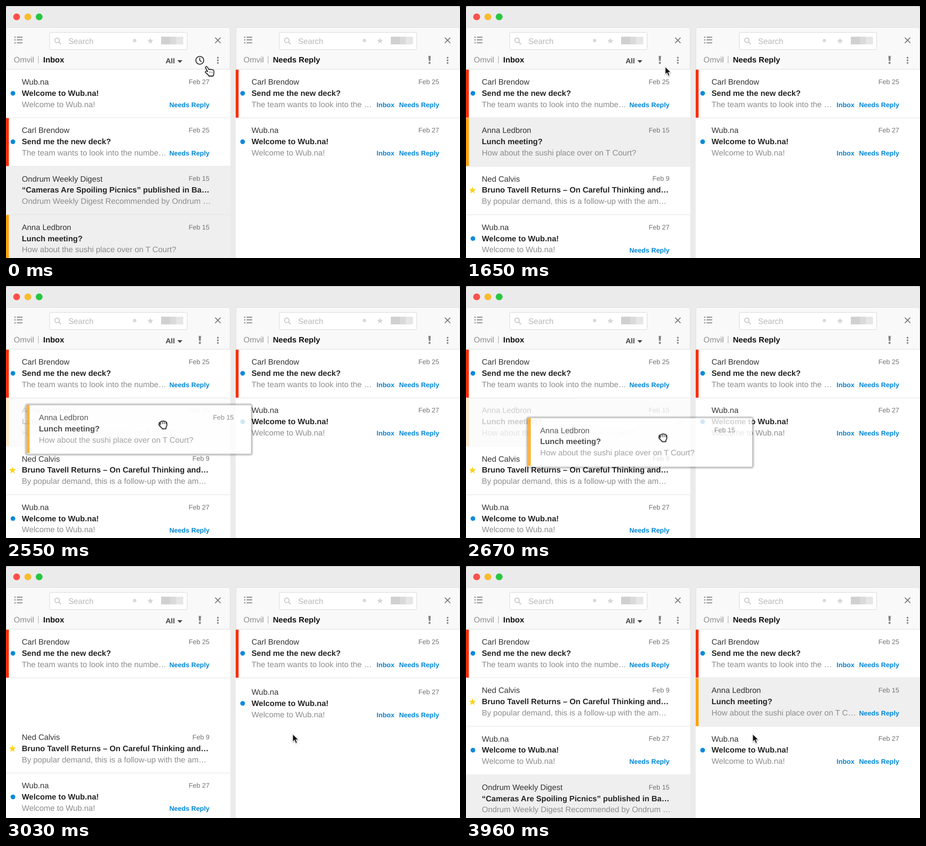
Recreate the animation shown at these times as an HTML page. Size 1004x558 px, loop 4710 ms.

```html
<!DOCTYPE html>
<html lang="en">
<head>
<meta charset="utf-8">
<title>Two mail panes</title>
<style>
html, body { margin: 0; height: 100%; overflow: hidden; background: #ebebeb; }
svg { display: block; }
text { font: 17.4px "Liberation Sans", Arial, sans-serif; fill: #333; text-rendering: geometricPrecision; }
.bold { font-weight: bold; fill: #252525; }
.soft { font-size: 17.55px; fill: #8c8c8c; }
.date { font-size: 14.8px; fill: #747474; text-anchor: end; }
.tag { font-size: 14.8px; font-weight: bold; fill: #0288d6; text-anchor: end; }
.line { fill: none; stroke: #858585; stroke-width: 2; }
#cursor { filter: drop-shadow(0 1px 1px rgba(0, 0, 0, .4)); }
</style>
</head>
<body>
<svg id="stage" width="1004" height="558" viewBox="0 0 1004 558"></svg>
<script>
const LOOP = 4710, STEP = 30, ROW = 107.2;

const text = (x, y, s, cls = '') => `<text x="${x}" y="${y}" class="${cls}">${s}</text>`;
const rect = (x, y, w, h, fill, more = '') =>
  `<rect x="${x}" y="${y}" width="${w}" height="${h}" fill="${fill}" ${more}/>`;
const dot = (x, y, r, fill) => `<circle cx="${x}" cy="${y}" r="${r}" fill="${fill}"/>`;
const path = (d, more) => `<path d="${d}" ${more}/>`;
const group = (id, body) => `<g id="${id}">${body}</g>`;

function star(x, y, r, fill) {
  const points = Array.from({ length: 10 }, (_, i) => {
    const a = i * Math.PI / 5, d = i % 2 ? r * .42 : r;
    return [x + d * Math.sin(a), y - d * Math.cos(a)].map(v => v.toFixed(2));
  });
  return `<polygon points="${points.join(' ')}" fill="${fill}"/>`;
}

const mails = {
  wub: { name: 'Wub.na', date: 'Feb 27', subject: 'Welcome to Wub.na!', body: 'Welcome to Wub.na!', reply: true, unread: true },
  carl: { name: 'Carl Brendow', date: 'Feb 25', subject: 'Send me the new deck?', body: 'The team wants to look into the numbe…',
    reply: true, unread: true, bar: '#ff2d0a' },
  digest: { name: 'Ondrum Weekly Digest', date: 'Feb 15', subject: '“Cameras Are Spoiling Picnics” published in Ba…',
    body: 'Ondrum Weekly Digest Recommended by Ondrum …', read: true },
  anna: { name: 'Anna Ledbron', date: 'Feb 15', subject: 'Lunch meeting?', body: 'How about the sushi place over on T Court?',
    read: true, bar: '#ffa20a' },
  ned: { name: 'Ned Calvis', date: 'Feb 9', subject: 'Bruno Tavell Returns – On Careful Thinking and…',
    body: 'By popular demand, this is a follow-up with the am…', starred: true }
};

// `inset` moves the left and right text edges outward, as on the dragged card.
function row(m, inset = 0) {
  const left = 35 - inset, right = 450 + inset;
  return rect(0, 0, 496, ROW, m.read ? '#efefef' : '#fff') +
    (inset || m.last ? '' : rect(0, ROW - 1, 496, 1, '#dedede')) +
    (m.bar ? rect(0, 0, 6.3, ROW - 1, m.bar) : '') +
    (m.unread ? dot(15.3, 52.3, 5.2, '#0a8ade') : '') +
    (m.starred ? star(14.3, 53, 8.2, '#fbd414') : '') +
    text(left, 33.3, m.name) + text(right, 32, m.date, 'date') +
    text(left, 58, m.subject, 'bold') + text(left, 82.8, m.body, 'soft') +
    (m.reply ? text(right, 83, 'Needs Reply', 'tag') : '') +
    (m.inbox ? text(351, 83, 'Inbox', 'tag') : '');
}

const bang = path('M426 110.5h5.4l-.9 11.3h-3.6z', 'fill="#858585"') + dot(428.7, 126, 2.4, '#858585');
const clock = dot(428.5, 120.5, 17, '#fcfcfc') +
  path('M419.8 120.2a8.8 8.8 0 1 0 17.6 0a8.8 8.8 0 1 0-17.6 0M428.5 114.5v6l4 3', 'class="line" style="stroke:#333"');

function header(title, extra) {
  const bullets = [69, 75, 81.5].map(y => rect(18.5, y - 1, 3, 2.2, '#858585') + rect(24, y - 1, 12.5, 2, '#858585')).join('');
  const more = [114.5, 120.2, 126].map(y => dot(468.5, y, 2, '#858585')).join('');
  return rect(.5, 47.5, 495, 520, '#f9f9f9', 'rx="5" stroke="#dcdcdc"') +
    rect(0, 140, 496, 418, '#fff') + rect(0, 139.5, 496, 1, '#dadada') + bullets +
    rect(96.5, 58.5, 304, 38, '#fff', 'rx="2" stroke="#d6d6d6"') +
    path('M108 76a5 5 0 1 0 10 0a5 5 0 1 0-10 0M116.7 79.7l5 5', 'class="line" style="stroke:#c6c6c6"') +
    text(138, 83.6, 'Search', 'soft" style="fill:#b8b8b8') +
    dot(284.5, 76.5, 3.8, '#d9d9d9') + star(319.2, 77.5, 7.2, '#d6d6d6') +
    rect(343, 68, 20, 17, '#d0d0d0') + rect(363, 68, 13, 17, '#dadada') + rect(376, 68, 16, 17, '#e6e6e6') +
    path('M462.5 70l12 12m0-12l-12 12', 'class="line" style="stroke:#777;stroke-width:1.8"') +
    text(17.3, 125, 'Omvil', 'soft') + rect(71, 111, 1.2, 16, '#aaa') +
    text(82.3, 125, title, 'bold" style="fill:#111') + more + extra;
}

const leftKeys = ['wub', 'carl', 'digest', 'anna', 'ned'];
const list = body => `<svg y="141" width="496" height="417">${body}</svg>`;
const needsReply =
  group('added', row({ ...mails.anna, body: 'How about the sushi place over on T C…', reply: true })) +
  group('pushed', row({ ...mails.wub, inbox: true, last: true })) +
  row({ ...mails.carl, body: 'The team wants to look into the …', inbox: true });

// The shadow is made of rings, so that none of it shows through the card.
const shadow = [1, 3, 5].map(w =>
  rect(-w / 2, .5 - w / 2, 496 + w, ROW + w, 'none', `rx="${2 + w / 2}" stroke="#000" stroke-opacity=".11" stroke-width="${w}"`)).join('');
const outline = 'fill="#fff" stroke="#2b2b2b" stroke-width="1.8" stroke-linejoin="round"';

stage.innerHTML =
  rect(0, 0, 1004, 558, '#bcbcbc') + rect(0, 1, 1004, 565, '#ebebeb', 'rx="5"') +
  dot(23.5, 24, 7.6, '#fc5149') + dot(48.4, 24, 7.6, '#f9ba2c') + dot(73.3, 24, 7.6, '#27c73f') +
  header('Inbox', text(353, 127, 'All', 'bold" style="font-size:16px;fill:#444') +
    path('M379 120h11l-5.5 6z', 'fill="#444"') + group('clock', clock) + group('bang', bang)) +
  list(leftKeys.map(k => group(k, row(mails[k]))).join('') +
    group('check', path('M466.5 53l5 5l9-10', 'class="line" style="stroke:#c6c6c6;stroke-width:3.6"'))) +
  `<g transform="translate(508)">${header('Needs Reply', bang)}${list(needsReply)}</g>` +
  group('card', `${shadow}<g opacity=".8">${row({ ...mails.anna, read: false }, 8)}</g>`) +
  group('cursor',
    group('point', path('M0 2q1-4 4-1l4 6q2-2 4 0q2-1 3.5 .5q2.5-.5 3 2v6q0 3-2 5.500h-8.500q-3-5-8-8q-1-3 3-2.500l2 .8z', outline) +
      path('M9 11v3m3-3v3m3-2v3', 'stroke="#555"')) +
    group('arrow', path('M0 0V17.500L4 13.700L6.800 20.500L10 19.100L7.200 12.500H12.800Z', 'fill="#111" stroke="#fff" stroke-width="1.2"')) +
    group('fist', path('M-1 6q0-4 3-3q1-3 4-2q2-2 4 0q3-1 4 1.500q2 0 2 3v4q0 2-2 4.500v3h-8q-1-2-3.500-4q-4-3-4-5.500q0-2 2.500-2z', outline) +
      path('M2 3v5m4-6v5m4-5v5m4-4v4M1 6v4', 'stroke="#2b2b2b" stroke-width="1.5"')));

const $ = id => document.getElementById(id);
const mix = (a, b, p) => a + (b - a) * p;
const span = (t, a, b) => Math.min(1, Math.max(0, (t - a) / (b - a)));
const smooth = p => p * p * (3 - 2 * p);
const move = (id, x, y) => $(id).setAttribute('transform', `translate(${x} ${y})`);
const show = (id, on) => { $(id).style.display = on ? '' : 'none'; };

// Slots: at first, sorted by priority, after the drop.
const slots = { wub: [0, 3, 2], carl: [1, 0, 0], digest: [2, 4, 3], anna: [3, 1, 1], ned: [4, 2, 1] };

function draw(t) {
  const sort = smooth(span(t, 1140, 1380));
  const approach = smooth(span(t, 1630, 2280));
  const drag = span(t, 2460, 3000);
  const drop = smooth(span(t, 3000, 3270));
  const dragging = t >= 2490 && t <= 3000, dropped = t > 3000;

  for (const k of leftKeys) {
    const [a, b, c] = slots[k];
    move(k, 0, ROW * (mix(a, b, sort) + (c - b) * drop));
  }
  show('anna', !dropped);
  $('anna').style.opacity = dragging ? .23 : 1;
  show('clock', t <= 1140);
  show('bang', t > 1140);

  move('pushed', 0, ROW * (1 + drop));
  move('added', 0, ROW);
  $('added').style.opacity = drop;

  let x = mix(441, 271, approach), y = mix(134, 274, approach);
  if (t >= 2490) {
    x = mix(271, 634, 1 - (1 - drag) ** 1.15);
    y = mix(274, 372, 1 - (1 - drag) ** 1.6);
  }
  move('cursor', x, y);
  show('point', t < 1650);
  show('fist', dragging);
  show('arrow', t >= 1650 && !dragging);

  // The card slowly catches up with the hand.
  move('card', Math.max(0, x - mix(296, 283, drag)), Math.max(248, y - 35));
  show('card', dragging);

  show('check', t >= 1650 && y > 141 && t < 2760);
  move('check', 0, y < 248 ? 0 : ROW);
  $('check').style.opacity = dragging ? .25 : 1;
}

function frame(now) {
  draw(Math.floor(now % LOOP / STEP) * STEP);
  requestAnimationFrame(frame);
}
draw(0);
requestAnimationFrame(frame);
</script>
</body>
</html>
```
